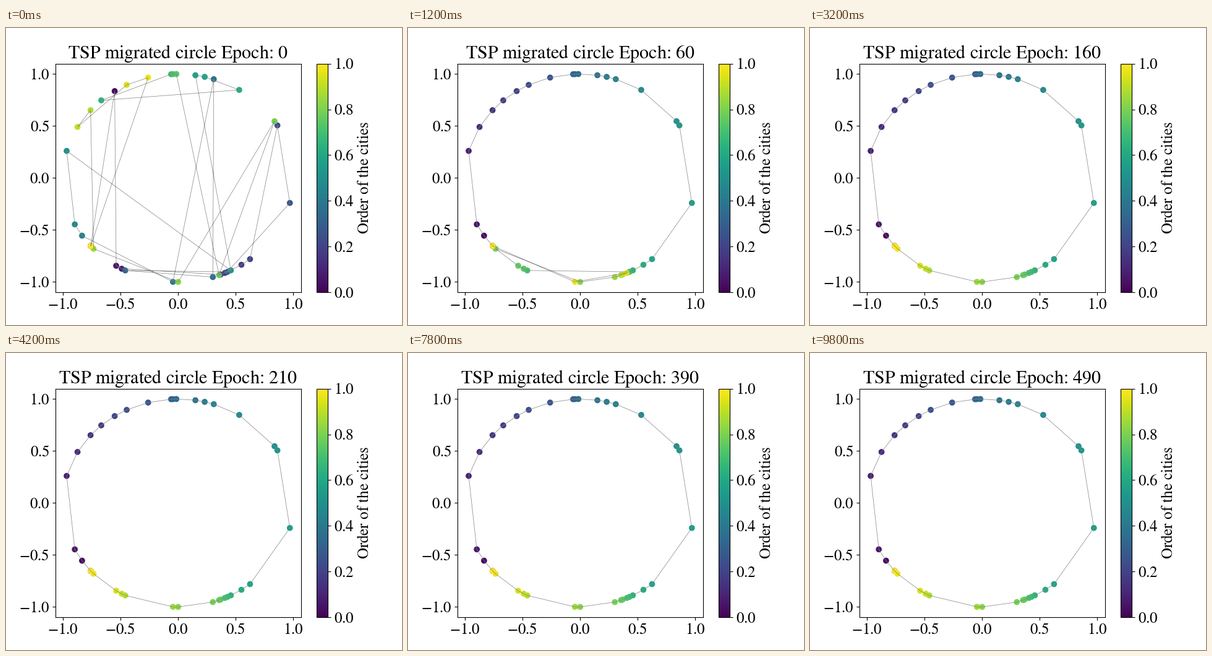
A matplotlib script that plays this animation: 640 by 480 pixels, repeating every 10 s.

```python
import matplotlib.pyplot as plt
import numpy as np
from matplotlib.animation import FuncAnimation

plt.rcParams.update({
    "font.family": "Liberation Serif",
    "font.size": 18,
    "mathtext.fontset": "stix",
})

FRAMES, INTERVAL = 50, 200
HALF_STEP, BEST_STEP = 3, 8

# City angles in degrees, in order around the circle.
ANGLES = np.radians([
    220.8, 213.7, 206.5, 164.9, 150.6, 139.3, 131.7, 123.3, 116.4,
    105, 93.4, 92.5, 90.8, 81.3, 76.6, 71.9, 57.9, 33.1, 30.4,
    -13.9, -51.3, -56.6, -62.7, -64.6, -66, -68.3, -69.1, -72.4,
    -89.9, -92.5, -117.2, -119.2, -122.4, -137.1,
])
CITIES = np.exp(1j * ANGLES)


def fill(order):
    """Insert every missing city where it lengthens the tour least."""
    order = list(order)
    for city in range(len(CITIES)):
        if city in order:
            continue
        a = CITIES[order]
        b = np.roll(a, -1)
        detour = abs(CITIES[city] - a) + abs(CITIES[city] - b) - abs(a - b)
        order.insert(int(np.argmin(detour)) + 1, city)
    return order


# Tours grown from the ends of their long hops.
START = fill([0, 7, 32, 24, 20, 18, 19, 23, 30, 27, 15, 29, 2, 3, 22, 13,
              16, 6, 11, 26, 17, 28, 33, 5, 4, 8, 9])
HALFWAY = fill([0, 2, 3, 13, 9, 15, 19, 30, 33, 1, 5, 8, 28, 24, 29])
BEST = list(range(len(CITIES)))


def merge(old, new, share):
    """Put the first part of the new tour before the rest of the old one."""
    head = new[:round(share * len(new))]
    return head + [c for c in old if c not in head]


def tour(step):
    if step < HALF_STEP:
        order = merge(START, HALFWAY, step / HALF_STEP)
    else:
        share = min(1, (step - HALF_STEP) / (BEST_STEP - HALF_STEP))
        order = merge(HALFWAY, BEST, share)
    path = CITIES[order + order[:1]]
    return np.column_stack([path.real, path.imag])


def roman(text):
    return rf"$\text{{{text}}}$"


def tick_labels(values):
    return [("${-}$" if v < 0 else "") + roman(f"{abs(v):.1f}")
            for v in values]


fig, ax = plt.subplots(figsize=(6.4, 4.8), dpi=100)
path = tour(0)
dots = ax.scatter(*path.T, c=np.linspace(0, 1, len(path)), cmap="viridis",
                  vmin=0, vmax=1)
line, = ax.plot(*path.T, color="gray", lw=0.5)
title = ax.set_title("")

ticks = np.linspace(-1, 1, 5)
ax.set_xticks(ticks, tick_labels(ticks))
ax.set_yticks(ticks, tick_labels(ticks))

bar = fig.colorbar(dots, ax=ax, label=roman("Order of the cities"))
levels = np.linspace(0, 1, 6)
bar.set_ticks(levels, labels=tick_labels(levels))


def update(step):
    path = tour(step)
    dots.set_offsets(path)
    line.set_data(*path.T)
    title.set_text(roman(f"TSP migrated circle Epoch: {10 * step}"))
    return dots, line, title


anim = FuncAnimation(fig, update, frames=FRAMES, interval=INTERVAL,
                     repeat=True, repeat_delay=0, blit=False)
plt.show()
```
